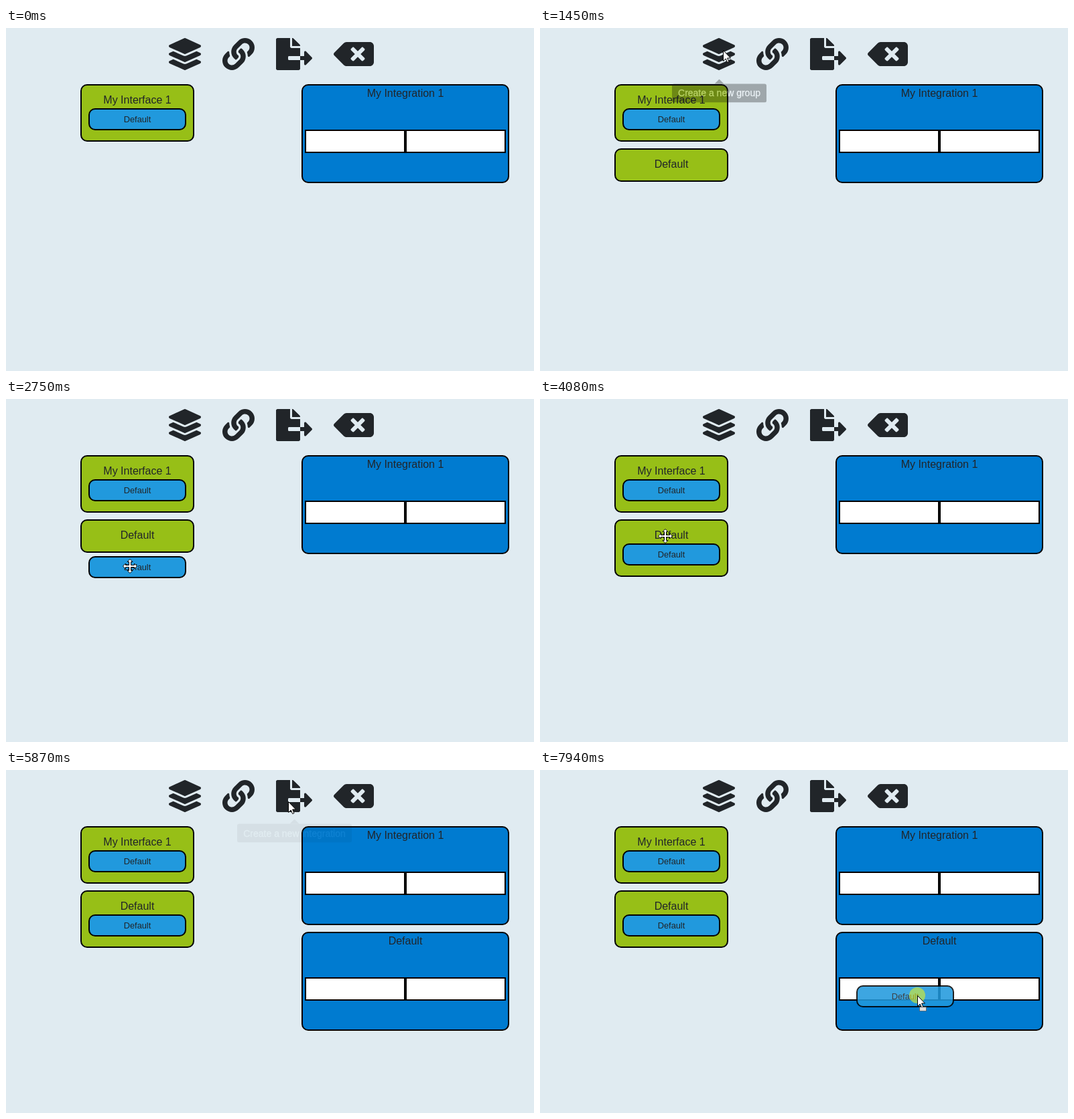
An HTML page for the animation above (8 s loop, 788 by 513 pixels).

```html
<!DOCTYPE html>
<html lang="en">
<head>
<meta charset="utf-8">
<title>Interface editor</title>
<style>
html, body { margin: 0; width: 100%; height: 100%; overflow: hidden; background: #e0ebf1; }
svg { display: block; width: 788px; height: 513px; }
text { font: 16px "Liberation Sans", Arial, sans-serif; fill: #212529; text-anchor: middle; }
.small { font-size: 12.8px; }
.icons { fill: #212529; }
.group, .slot, .panel, .cell { stroke: #000; stroke-width: 2px; }
.group { fill: #97bf17; }
.slot { fill: #2199dd; }
.panel { fill: #007bd0; }
.cell { fill: #fff; }
.tip rect, .tip path { fill: #111; fill-opacity: .9; }
.tip text { font-size: 14px; fill: #fff; stroke: #fff; stroke-width: .3px; }
.ghost .slot { fill: #56b4e4; stroke: #173d52; }
.ghost text { fill: #47718a; }
.arrow, .cross { fill: #fff; stroke: #000; }

/* One loop is 8 s, so 1% is 80 ms. */
.tip, .cursor { animation: 8s linear infinite; }
.step { animation: 8s step-end infinite; }
.tip { opacity: 0; }
.tip1 { animation-name: tip1; }
.tip2 { animation-name: tip2; }
.tip3 { animation-name: tip3; }
.cursor { animation-name: travel; animation-timing-function: ease-in-out; }
.new-group { animation-name: new-group; }
.new-group .group { animation-name: grow; }
.new-slot { animation-name: new-slot; }
.new-panel { animation-name: new-panel; }
.arrow { animation-name: arrow; }
.cross { animation-name: cross; }
.drag { animation-name: drag; }
.ghost { animation-name: grip; }
.press { animation-name: press; }

@keyframes new-group {
  0% { visibility: hidden; }
  17.1% { visibility: visible; }
}
@keyframes grow {
  0% { height: 48px; }
  51% { height: 84px; }
}
@keyframes new-slot {
  0% { visibility: hidden; transform: translateY(19px); }
  27.75% { visibility: visible; transform: translateY(19px); }
  51% { visibility: visible; transform: none; }
}
@keyframes new-panel {
  0% { visibility: hidden; }
  72.4% { visibility: visible; }
}
@keyframes tip1 {
  0%, 10.9%, 19.2%, 100% { opacity: 0; transform: translateY(-10px); }
  13.2%, 16.125% { opacity: 1; transform: none; }
}
@keyframes tip2 {
  0%, 23%, 29%, 100% { opacity: 0; transform: translateY(-10px); }
  25.2%, 26.75% { opacity: 1; transform: none; }
}
@keyframes tip3 {
  0%, 67.3%, 73.5%, 100% { opacity: 0; transform: translateY(-10px); }
  69.5%, 71.375% { opacity: 1; transform: none; }
}
@keyframes travel {
  0%, 3.75% { transform: translate(735px, 494px); }
  11% { transform: translate(274px, 42px); }
  13.25%, 19% { transform: translate(273px, 33px); }
  23.75%, 28.6% { transform: translate(347px, 33px); }
  34.3%, 38.37% { transform: translate(185px, 250px); }
  38.375% { transform: translate(187px, 243px); }
  42.25% { transform: translate(187px, 205px); }
  58.875% { transform: translate(187px, 205px); animation-timing-function: ease-in; }
  64.625% { transform: translate(403px, 76px); animation-timing-function: ease-out; }
  68.375%, 74.4% { transform: translate(421px, 47px); }
  81.125% { transform: translate(237px, 218px); }
  85.875%, 93.5% { transform: translate(212px, 231px); }
  99.25%, 100% { transform: translate(563px, 337px); }
}
@keyframes arrow {
  0%, 33.3%, 51%, 80.2% { visibility: hidden; }
  3.75%, 38.375%, 58.9%, 93.5% { visibility: visible; }
}
@keyframes cross {
  0%, 38.375%, 58.9%, 93.5% { visibility: hidden; }
  33.3%, 51%, 80.2% { visibility: visible; }
}
@keyframes drag {
  0%, 51% { visibility: hidden; }
  38.375%, 93.5% { visibility: visible; }
}
@keyframes grip {
  0% { transform: translate(-62px, -15px); }
  60% { transform: translate(-91px, -15px); }
}
@keyframes press {
  0%, 17.9%, 28.5%, 51%, 73.1% { visibility: hidden; }
  16.125%, 26.75%, 38.375%, 71.375%, 93.5% { visibility: visible; }
}
</style>
</head>
<body>
<svg viewBox="0 0 788 513">
  <defs>
    <path id="layer" d="M499.6 236.3l-58.1-26.3-161.6 73.2c-7.6 3.4-15.6 5.2-23.9 5.2s-16.3-1.8-23.9-5.2L70.5 210l-58.1 26.3c-16.5 7.5-16.5 32.5 0 40l233 105.6c6.8 3.1 14.5 3.1 21.2 0l233-105.6c16.5-7.5 16.5-32.5 0-40z"/>
    <path id="chain" d="M326.6 185.4c59.7 59.8 58.9 155.7.4 214.6l-67.6 67.6c-59.3 59.2-155.7 59.2-215 0-59.2-59.3-59.2-155.7 0-215l37.2-37.1c9.8-9.8 26.7-3.3 27.2 10.6.7 17.7 3.9 35.5 9.7 52.7 2 5.9.6 12.3-3.7 16.7l-13.1 13c-28 28.1-28.9 73.7-1.2 102 28 28.6 74.1 28.7 102.4.5l67.2-67.2c28.1-28.2 28-73.7 0-101.8-3.8-3.7-7.5-6.6-10.4-8.6a16 16 0 0 1-6.9-12.6c-.4-10.6 3.3-21.4 11.7-29.8l21-21.1c5.6-5.5 14.2-6.2 20.6-1.7a152 152 0 0 1 20.5 17.2z"/>
    <g id="slot">
      <rect class="slot" x="1" y="1" width="144" height="31" rx="9"/>
      <text class="small" x="73" y="21">Default</text>
    </g>
    <g id="panel">
      <rect class="panel" x="442" y="85" width="308" height="146" rx="9"/>
      <rect class="cell" x="447" y="153" width="148" height="33"/>
      <rect class="cell" x="597" y="153" width="148" height="33"/>
    </g>
  </defs>

  <g class="icons">
    <g transform="translate(243 15) scale(.09375)">
      <path d="M12.4 148l233 105.7c6.8 3.1 14.5 3.1 21.2 0l233-105.7c16.5-7.5 16.5-32.5 0-40L266.6 2.3a25.6 25.6 0 0 0-21.2 0L12.4 108c-16.5 7.5-16.5 32.5 0 40z"/>
      <use href="#layer"/>
      <use href="#layer" y="127.8"/>
    </g>
    <g transform="translate(323 15) scale(.09375)">
      <use href="#chain"/>
      <use href="#chain" transform="rotate(180 256 256)"/>
    </g>
    <path transform="translate(403 15) scale(.09375)" d="M384 122c0-6.300-2.500-12.400-7-17L279 7c-4.500-4.500-10.600-7-17-7h-6v128h128zM571 308l-95.700-96.400c-10.100-10.100-27.400-3-27.400 11.300V288h-64v64h64v65.200c0 14.300 17.300 21.400 27.400 11.300L571 332c6.600-6.600 6.600-17.400 0-24zM192 336v-32c0-8.800 7.200-16 16-16h176V160H248c-13.200 0-24-10.800-24-24V0H24C10.700 0 0 10.700 0 24v464c0 13.300 10.700 24 24 24h336c13.300 0 24-10.700 24-24V352H208c-8.800 0-16-7.200-16-16z"/>
    <path transform="translate(489 15) scale(.09375)" d="M576 64H205.300A64 64 0 0 0 160 82.700L9.400 233.400c-12.500 12.500-12.500 32.700 0 45.200L160 429.300c12 12 28.300 18.700 45.300 18.700H576c35.300 0 64-28.700 64-64V128c0-35.300-28.700-64-64-64zm-84.700 254c6.300 6.300 6.300 16.400 0 22.700l-22.600 22.600c-6.300 6.300-16.400 6.300-22.700 0l-62-62-62 62c-6.300 6.300-16.400 6.300-22.700 0l-22.600-22.600c-6.300-6.300-6.300-16.400 0-22.700l62-62-62-62c-6.300-6.300-6.300-16.400 0-22.700l22.600-22.600c6.300-6.300 16.400-6.300 22.700 0l62 62 62-62c6.300-6.300 16.400-6.300 22.700 0l22.600 22.600c6.300 6.300 6.300 16.400 0 22.700l-62 62z"/>
  </g>

  <rect class="group" x="112" y="85" width="168" height="84" rx="9"/>
  <text x="196" y="113">My Interface 1</text>
  <use href="#slot" x="123" y="120"/>

  <g class="new-group step">
    <rect class="group step" x="112" y="181" width="168" height="48" rx="9"/>
    <text x="196" y="209">Default</text>
  </g>
  <g class="new-slot step"><use href="#slot" x="123" y="216"/></g>

  <use href="#panel"/>
  <text x="596" y="103">My Integration 1</text>
  <g class="new-panel step">
    <use href="#panel" y="158"/>
    <text x="596" y="261">Default</text>
  </g>

  <g class="tip tip1">
    <path d="M260.500 90l7-7 7 7z"/>
    <rect x="197" y="90" width="141" height="28" rx="3"/>
    <text x="267.500" y="109">Create a new group</text>
  </g>
  <g class="tip tip2">
    <path d="M340 90l7-7 7 7z"/>
    <rect x="267" y="90" width="160" height="28" rx="3"/>
    <text x="347" y="109">Create a new interface</text>
  </g>
  <g class="tip tip3">
    <path d="M423.500 90l7-7 7 7z"/>
    <rect x="345" y="90" width="171" height="28" rx="3"/>
    <text x="430.500" y="109">Create a new integration</text>
  </g>

  <g class="cursor">
    <g class="drag step">
      <g class="ghost step" opacity=".87"><use href="#slot"/></g>
    </g>
    <circle class="press step" r="12" fill="#ff0" fill-opacity=".5"/>
    <path class="arrow step" d="M.5.500V16.500L4.200 13 6.700 18.500 9 17.500 6.600 12H11.500Z"/>
    <g class="drag step">
      <rect x="3.500" y="17.500" width="10" height="6" fill="#ddd" stroke="#333" stroke-dasharray="1 1"/>
    </g>
    <path class="cross step" d="M0-10.500 4-6.500H1.500V-1.500H6.500V-4L10.500 0 6.500 4V1.500H1.500V6.500H4L0 10.500-4 6.500H-1.500V1.500H-6.500V4L-10.500 0-6.500-4V-1.500H-1.500V-6.500H-4Z"/>
  </g>
</svg>
</body>
</html>
```
